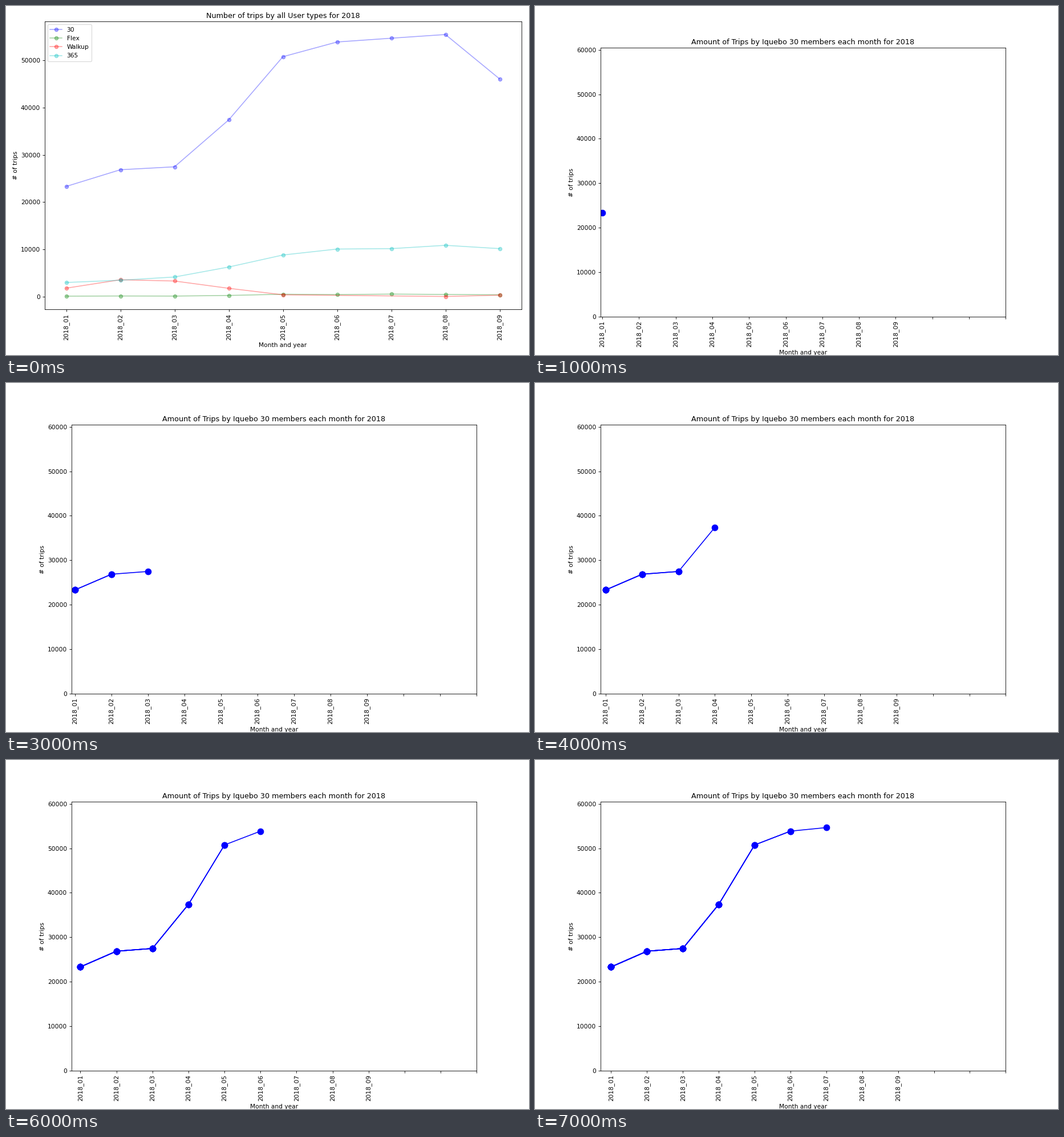
A matplotlib script that plays this animation: 917x611 px, repeating every 8000 ms.

```python
import matplotlib.pyplot as plt
from matplotlib.animation import FuncAnimation

W, H = 917, 611
DPI = H / 8
plt.rcParams["font.family"] = "DejaVu Sans"

MONTHS = [f"2018_{m:02d}" for m in range(1, 10)]
TRIPS = {
    "30": [23330, 26860, 27480, 37400, 50760, 53870, 54670, 55450, 46060],
    "Flex": [130, 170, 150, 280, 540, 460, 570, 490, 420],
    "Walkup": [1820, 3600, 3330, 1790, 420, 60, 340],
    "365": [3020, 3500, 4180, 6290, 8830, 10090, 10180, 10880, 10180],
}
COLORS = {"30": "b", "Flex": "g", "Walkup": "r", "365": "c"}
WALKUP_X = [0, 1, 2, 3, 4, 7, 8]  # two months have no walk-up trips

fig = plt.figure(figsize=((W + 1e-3) / DPI, (H + 1e-3) / DPI), dpi=DPI)


def add_axes(left, right, top, bottom, title):
    """Axes placed by pixel edges measured from the top left."""
    ax = fig.add_axes([left / W, 1 - bottom / H,
                       (right - left) / W, (bottom - top) / H])
    ax.set_title(title)
    ax.set_xlabel("Month and year")
    ax.set_ylabel("# of trips")
    return ax


def draw_overview():
    ax = add_axes(67.5, 903.5, 27, 531.5,
                  "Number of trips by all User types for 2018")
    for name, trips in TRIPS.items():
        x = WALKUP_X if name == "Walkup" else range(len(trips))
        ax.plot(x, trips, COLORS[name] + "o-", alpha=0.35, label=name)
    ax.set_xticks(range(9), MONTHS, rotation=90)
    ax.set_yticks(range(0, 50001, 10000))
    ax.legend(loc="upper left")


def draw_members(n):
    """Line through the first n months; earlier passes stay underneath."""
    ax = add_axes(0.125 * W, 0.9 * W, 0.12 * H, 0.89 * H,
                  "Amount of Trips by Iquebo 30 members each month for 2018")
    trips = TRIPS["30"]
    for k in range(1, n + 1):
        ax.plot(range(k), trips[:k], "bo-", markersize=10)
    ax.set_xticks(range(12), MONTHS + [""] * 3, rotation=90)
    ax.set_yticks(range(0, 60001, 10000))
    ax.set_xlim(-0.05 * (n - 1) if n > 1 else -0.055, 11)
    ax.set_ylim(0, max(trips) + 5000)


def draw(i):
    fig.clear()
    if i == 0:
        draw_overview()
    else:
        draw_members(i)
    return fig.axes


anim = FuncAnimation(fig, draw, frames=8, interval=1000,
                     repeat=True, repeat_delay=0, blit=False)
plt.show()
```
